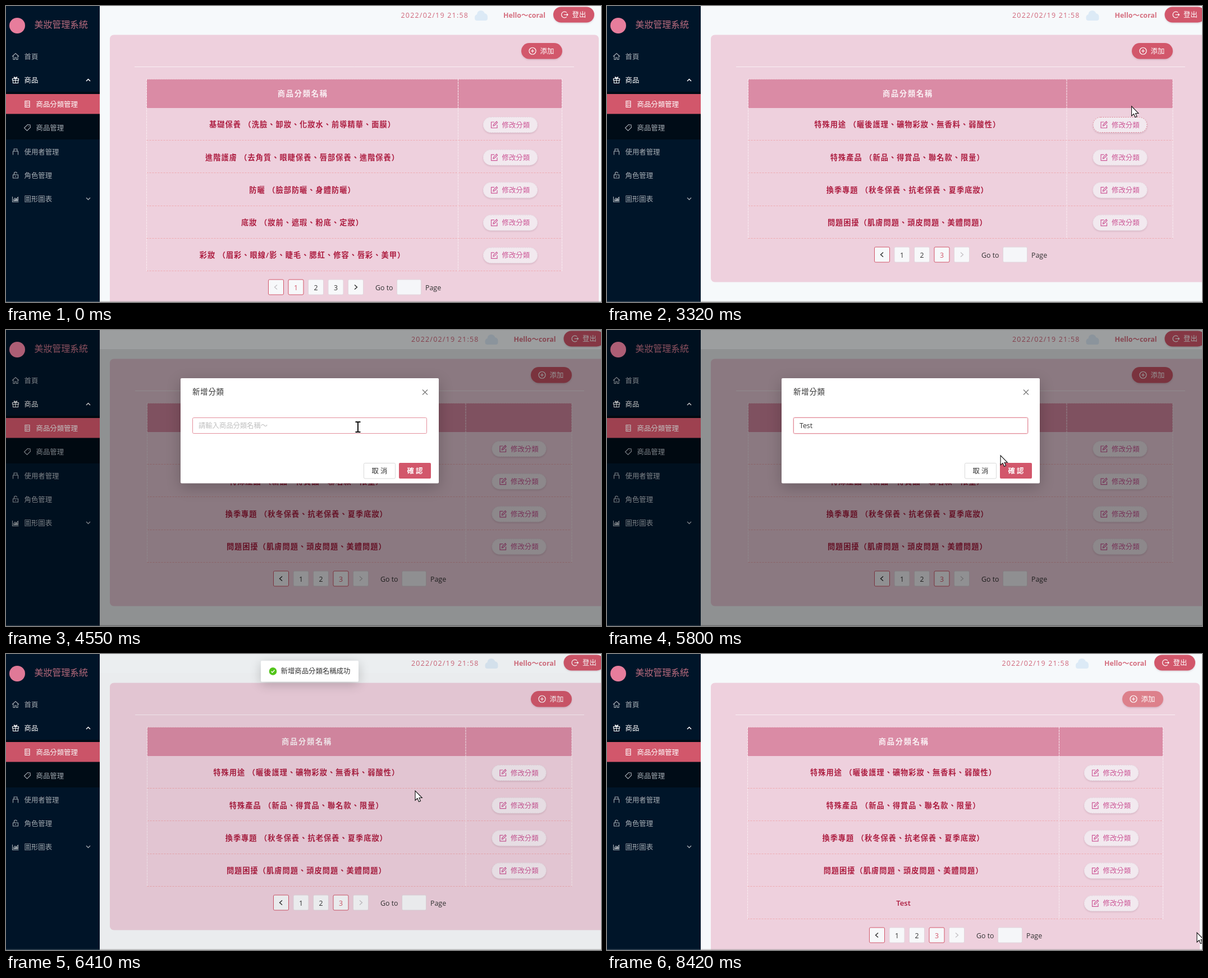
Animation, 1060 px wide and 528 px high, one loop 8500 ms. Source, as an HTML page with a canvas:

```html
<!DOCTYPE html>
<html lang="zh-Hant">
<head>
<meta charset="utf-8">
<title>管理系統</title>
<style>
html, body { margin: 0; width: 100%; height: 100%; overflow: hidden; background: #f6f9fb; }
canvas { display: block; width: 1060px; height: 528px; }
</style>
</head>
<body>
<canvas id="stage" width="1060" height="528"></canvas>
<script>
const ctx = document.getElementById('stage').getContext('2d');
const LOOP = 8500, HOLD = 840, STEP = 77.3;
const FONT = '"Open Sans", "Noto Sans CJK TC", "Noto Sans CJK JP", sans-serif';
const ROSE = '#d2576b', ROSE_LIGHT = '#dd808b', PINK = '#eed0dd', CRIMSON = '#ad1d40';

const PAGES = [
  ['基礎保養 （洗臉、卸妝、化妝水、前導精華、面膜）', '進階護膚 （去角質、眼睫保養、唇部保養、進階保養）',
   '防曬 （臉部防曬、身體防曬）', '底妝 （妝前、遮瑕、粉底、定妝）',
   '彩妝 （眉彩、眼線/影、睫毛、腮紅、修容、唇彩、美甲）'],
  ['身體保養 （手部保養、腿足保養、私密護理、沐浴清潔）', '美髮 （洗髮、潤/護髮、染髮、頭皮護理、頭髮造型）',
   '香水香氛 （香水、香精、香氛）', '美容工具 （臉部保養工具、彩妝工具、按摩工具、美容家電）',
   '營養補給 （膠原蛋白、玻尿酸、積雪草 、維他命）'],
  ['特殊用途 （曬後護理、礦物彩妝、無香料、弱酸性）', '特殊產品 （新品、得賞品、聯名款、限量）',
   '換季專題 （秋冬保養、抗老保養、夏季底妝）', '問題困擾（肌膚問題、頭皮問題、美體問題）', 'Test']
];

const ICONS = {
  home: 'M-6 0L0-5.5L6 0M-4-1.5V5.5H-1.3V2H1.3V5.5H4V-1.5',
  gift: 'M-5.5-2.5H5.5V.5H-5.5ZM-4.5 .5V5.5H4.5V.5M0-2.5V5.5M0-2.5C-5-4-2-8 0-2.5C2-8 5-4 0-2.5',
  list: 'M-4-5.5H4V5.5H-4ZM-4-2H4M-4 2H4M-2-4H-.5M-2 0H-.5M-2 4H-.5',
  tag: 'M-5.5 .5L.5-5.5L5-5L5.5-.5L-.5 5.5ZM2-2.5H3',
  user: 'M-2.8-5H2.8V-1H-2.8ZM-4.5 5.5V-1H4.5V5.5',
  lock: 'M-4.5-1H4.5V5H-4.5ZM-2.5-1V-3A2.5 2.5 0 0 1 2.5-3.5M0 1V3',
  chart: 'M-5.5-4.5V5H5.5M-3.5 3V1L-1-2L1 0L4.5-3.5V3ZM-2.5 2H3.5M-2 1H4M0 .5H4',
  edit: 'M0-5H-5.5V5.5H5V0M-2 2L-1.5-.5L4-6L5.5-4L0 1.5Z',
  plus: 'M6 0A6 6 0 1 1-6 0A6 6 0 1 1 6 0M-3 0H3M0-3V3',
  exit: 'M3.8-3.8A5.4 5.4 0 1 0 3.8 3.8M-1 0H6M4-2L6 0L4 2',
  close: 'M-4.5-4.5L4.5 4.5M4.5-4.5L-4.5 4.5',
  up: 'M-3.5 2L0-1.5L3.5 2', down: 'M-3.5-2L0 1.5L3.5-2',
  prev: 'M2-4L-2.5 0L2 4', next: 'M-2-4L2.5 0L-2 4',
  check: 'M-3 0L-1 2L3-2.2'
};
const POINTERS = {
  arrow: 'M0 0V17L4 13.5L6.5 19.5L9.5 18.2L7 12.5H12.3Z',
  hand: 'M-1.5 1C-1.5-.7 1.7-.7 1.7 1V8L8 9.5Q9.5 10 9.2 12L8 18V22H-1V19.5L-6 13.5C-7.5 11-5 10-3.8 11.5L-1.5 13.8Z',
  beam: 'M-4.5-9H-1L0-8L1-9H4.5M0-8V8M-4.5 9H-1L0 8L1 9H4.5'
};

// time, x, y, pointer shape
const TRACK = [
  [840, 546, 526, 'arrow'], [980, 546, 506, 'hand'], [1070, 546, 503, 'hand'], [1500, 546, 503, 'hand'],
  [2000, 583, 502, 'hand'], [2390, 583, 502, 'arrow'], [2560, 583, 502, 'arrow'], [3090, 890, 225, 'hand'],
  [3230, 922, 202, 'hand'], [3310, 934, 181, 'arrow'], [3470, 958, 90, 'hand'], [3620, 968, 83, 'hand'],
  [4080, 968, 83, 'arrow'], [4380, 690, 160, 'beam'], [4540, 627, 173, 'beam'], [5480, 627, 173, 'beam'],
  [5640, 655, 195, 'arrow'], [5870, 727, 240, 'hand'], [5950, 729, 244, 'hand'], [6320, 729, 244, 'arrow'],
  [6550, 729, 244, 'arrow'], [6950, 905, 98, 'arrow'], [7040, 930, 85, 'hand'], [7880, 952, 83, 'hand'],
  [8060, 960, 90, 'arrow'], [8410, 1051, 497, 'arrow'], [LOOP, 1051, 497, 'arrow']
];

const clamp = v => Math.max(0, Math.min(1, v));
const span = (t, from, to) => clamp((t - from) / (to - from));
const within = (t, from, to) => t >= from && t < to;

function text(s, x, y, color, { size = 12.4, weight = 400, gap = 0, align = 'left' } = {}) {
  ctx.font = `${weight} ${size}px ${FONT}`;
  ctx.letterSpacing = gap + 'px';
  ctx.textAlign = align;
  ctx.fillStyle = color;
  ctx.fillText(s, x, y + size * 0.37);
}

function box(x, y, w, h, fill, { r = 0, stroke, dash = [] } = {}) {
  ctx.beginPath();
  ctx.roundRect(x, y, w, h, r);
  if (fill) { ctx.fillStyle = fill; ctx.fill(); }
  if (stroke) {
    ctx.setLineDash(dash);
    ctx.strokeStyle = stroke;
    ctx.lineWidth = 1;
    ctx.stroke();
    ctx.setLineDash([]);
  }
}

function line(x1, y1, x2, y2, color, dash = []) {
  ctx.beginPath();
  ctx.moveTo(x1, y1);
  ctx.lineTo(x2, y2);
  ctx.setLineDash(dash);
  ctx.strokeStyle = color;
  ctx.lineWidth = 1;
  ctx.stroke();
  ctx.setLineDash([]);
}

function disc(x, y, r, color) {
  ctx.beginPath();
  ctx.arc(x, y, r, 0, Math.PI * 2);
  ctx.fillStyle = color;
  ctx.fill();
}

function icon(name, x, y, color, width = 1.1) {
  ctx.save();
  ctx.translate(x, y);
  ctx.strokeStyle = color;
  ctx.lineWidth = width;
  ctx.stroke(new Path2D(ICONS[name]));
  ctx.restore();
}

function shadow(color, blur, dy = 0) {
  ctx.shadowColor = color;
  ctx.shadowBlur = blur;
  ctx.shadowOffsetY = dy;
}

function pill(x, y, w, h, label, glyph, fill, color, opts = {}) {
  ctx.save();
  shadow('rgba(90,40,60,.16)', 3, 1.5);
  box(x, y, w, h, fill, { r: h / 2 });
  ctx.restore();
  if (opts.stroke) box(x + .5, y + .5, w - 1, h - 1, null, { r: h / 2, ...opts });
  icon(glyph, x + 20, y + h / 2, color, 1.2);
  text(label, x + 33.5, y + h / 2, color);
}

function sidebar() {
  const dim = '#a6adb4';
  box(0, 0, 167, 528, '#001529');
  box(0, 153, 167, 85, '#000c17');
  box(0, 157, 167, 35.5, ROSE);
  disc(20, 35, 14, '#e77d9c');
  text('美妝管理系統', 50.5, 33, '#b96b7e', { size: 15.9 });
  [['home', '首頁', 90], ['gift', '商品', 132, '#fff'], ['user', '使用者管理', 260],
   ['lock', '角色管理', 302], ['chart', '圖形圖表', 344.5]].forEach(([glyph, label, y, color = dim]) => {
    icon(glyph, 17, y, color);
    text(label, 32.5, y, color);
  });
  icon('list', 38, 175, '#fff');
  text('商品分類管理', 53.5, 175, '#fff');
  icon('tag', 38, 217, dim);
  text('商品管理', 53.5, 217.5, dim);
  icon('up', 146.5, 132, '#fff', 1.5);
  icon('down', 146.5, 344, dim, 1.3);
}

function topBar(dx) {
  text('2022/02/19 21:58', 703.5 + dx, 16.5, '#d0667a', { size: 12.4, gap: 1.25 });
  const x = 846 + dx;
  [[-6, 3, 5], [0, -2, 7], [6, 2, 6]].forEach(([cx, cy, r]) => disc(x + cx, 17 + cy, r, '#dceaf6'));
  box(x - 11, 18, 23, 8, '#dceaf6', { r: 4 });
  text('Hello～coral', 886 + dx, 16.5, '#d57080', { size: 12.4, weight: 700 });
  pill(975 + dx, 1.5, 73, 28, '登出', 'exit', ROSE, '#fff');
}

function table(t, wide, rows) {
  const left = wide ? 251.5 : 250.5, right = wide ? 1008 : 990.5, mid = wide ? 819 : 805.5;
  const bottom = 182 + rows.length * 58.2;
  const cx = (left + mid) / 2, bx = wide ? 865.5 : 850;
  box(left, 130, right - left, 52, '#da8ba5');
  line(left, 130.5, right, 130.5, '#f6e6ec', [2, 1]);
  text('商品分類名稱', cx + .7, 156.5, '#faf0f4', { size: 13.3, weight: 700, gap: 1.7, align: 'center' });
  rows.forEach((row, i) => {
    const y = 211.5 + i * 58.2, hot = i === 0 && within(t, 3080, 3380);
    text(row, cx, y, CRIMSON, { size: 13.2, weight: 600, gap: row === 'Test' ? 0 : 1.05, align: 'center' });
    const base = Math.round(182 + (i + 1) * 58.2) - .5;
    line(left, base, right, base, '#eeaab1', [3, 2]);
    pill(bx, y - 13.5, 97, 28, '修改分類', 'edit', '#f2e9ef', '#cc5796',
      { stroke: hot ? '#df7f90' : '#e6dbe3', dash: [2, 2] });
  });
  [left, mid, right].forEach(x => line(x, 130, x, bottom, '#f8eaf0', [4, 1]));
}

function pagination(t, dx, y, page) {
  const labels = ['prev', '1', '2', '3', 'next'];
  const hovered = within(t, 990, 1900) ? 2 : within(t, 2140, 2390) ? 3 : 0;
  labels.forEach((label, i) => {
    const x = 467.5 + dx + i * 35.5, on = i === page, hot = i === hovered;
    box(x, y, 27, 27, '#f7f8fa', { r: 2, stroke: on || hot ? ROSE : '#e1d5dc' });
    if (ICONS[label]) {
      const off = i ? page === 3 : t < 1500;
      icon(label, x + 13.5, y + 13.5, off ? '#c3c0c4' : '#222', 1.3);
    } else {
      text(label, x + 13.5, y + 14, on && hot ? '#e79aa6' : on || hot ? ROSE : '#333', { align: 'center' });
    }
  });
  text('Go to', 658 + dx, y + 14, '#333');
  box(696.5 + dx, y, 43, 27, '#f5f6f9', { r: 2, stroke: '#e1d5dc' });
  text('Page', 747 + dx, y + 14, '#333');
}

function content(t) {
  const wide = within(t, 2390, 6550);
  const page = t < 1215 ? 1 : t < 2300 ? 2 : 3;
  const shown = t < 1215 ? 0 : t < 2390 ? 1 : 2;
  const rows = PAGES[shown].slice(0, wide ? 4 : 5);
  box(167, 0, 893, 528, '#f6f9fb');
  topBar(wide ? 18.5 : 0);
  box(185, 51.5, wide ? 889 : 871, wide ? 441 : 500, PINK, { r: 7 });
  line(wide ? 230 : 229, 108.5, wide ? 1030 : 1012, 108.5, '#f9eef3');
  const hot = within(t, 3450, 4000) || t >= 7030;
  pill(wide ? 935 : 918, 66, 73, 28.5, '添加', 'plus', hot ? ROSE_LIGHT : ROSE, '#fff');
  table(t, wide, rows);
  pagination(t, wide ? 9 : 0, wide ? 430 : 488, page);
  box(0, 526.5, 1060, 1.5, 'rgba(150,150,150,.55)');
}

function mask(t) {
  const a = .42 * (t < 6000 ? span(t, 3990, 4230) : 1 - .88 * span(t, 6270, 6400));
  if (t < 3990 || t > 6450) return;
  box(167, 0, 893, 33.5, `rgba(0,0,0,${a * .88})`);
  box(167, 33.5, 893, 494.5, `rgba(0,0,0,${a})`);
  box(0, 0, 167, 528, `rgba(0,0,0,${a * .6})`);
}

function modal(t) {
  const closing = t > 6200;
  const p = closing ? 1 - span(t, 6200, 6400) ** 2.3 : 1 - (1 - span(t, 4060, 4270)) ** 3;
  if (p <= 0) return;
  ctx.save();
  ctx.globalAlpha = p;
  ctx.translate(980, 80);
  ctx.scale(.2 + .8 * p, .2 + .8 * p);
  ctx.translate(-980, -80);
  ctx.save();
  shadow('rgba(0,0,0,.22)', 26, 7);
  box(311, 86, 460, 187.5, '#fff', { r: 2 });
  ctx.restore();
  text('新增分類', 332, 110.5, '#333', { size: 13.4, gap: .8 });
  icon('close', 746.5, 111, '#777', 1.2);

  const focus = within(t, 4850, 6200);
  if (focus) box(331.5, 155.5, 419, 30, null, { r: 3, stroke: 'rgba(210,87,107,.25)' });
  if (!closing) box(332.5, 156.5, 417, 28, '#fff', { r: 2, stroke: t > 4380 ? '#e48f9c' : '#d9d9d9' });
  const typed = closing || t < 5250 ? '' : t < 5480 ? 'Tes' : 'Test';
  text(typed || '請輸入商品分類名稱～', 343, 170.5, typed ? '#333' : '#bfbfbf', { size: 12.3 });

  if (!closing) box(637.5, 237.5, 56, 27.5, '#fff', { r: 2, stroke: '#d9d9d9' });
  text('取 消', 665.5, 251, '#333', { align: 'center' });
  box(700, 237, 57, 28, within(t, 5860, 6400) ? ROSE_LIGHT : ROSE, { r: 2 });
  text('確 認', 728.5, 251, '#fff', { weight: 600, align: 'center' });
  ctx.restore();
}

function message(t) {
  if (t < 6215 || t > 7800) return;
  const p = 1 - (1 - span(t, 6215, 6515)) ** 6, out = span(t, 7500, 7800);
  const y = 12 - 51 * (1 - p) - 40 * out * out;
  ctx.save();
  ctx.globalAlpha = clamp(p * 1.6) * (1 - out);
  ctx.save();
  shadow('rgba(0,0,0,.2)', 20, 5);
  box(454, y, 174, 37.5, '#fff', { r: 2 });
  ctx.restore();
  disc(475.5, y + 19, 6.8, '#52c41a');
  icon('check', 475.5, y + 19, '#fff', 1.4);
  text('新增商品分類名稱成功', 489.5, y + 19, '#333');
  ctx.restore();
}

function pointer(t) {
  if (t < TRACK[0][0]) return;
  let i = 0;
  while (i < TRACK.length - 2 && TRACK[i + 1][0] <= t) i++;
  const [t0, x0, y0, shape] = TRACK[i], [t1, x1, y1] = TRACK[i + 1];
  const k = span(t, t0, t1);
  ctx.save();
  ctx.translate(x0 + (x1 - x0) * k, y0 + (y1 - y0) * k);
  const path = new Path2D(POINTERS[shape]);
  ctx.strokeStyle = '#111';
  ctx.lineWidth = shape === 'beam' ? 2 : 1.1;
  ctx.fillStyle = '#fff';
  if (shape !== 'beam') ctx.fill(path);
  ctx.stroke(path);
  ctx.restore();
}

function draw(t) {
  ctx.clearRect(0, 0, 1060, 528);
  content(t);
  sidebar();
  box(0, 526.5, 167, 1.5, 'rgba(120,130,140,.4)');
  mask(t);
  modal(t);
  message(t);
  pointer(t);
}

const sample = t => t < HOLD ? 0 : HOLD + Math.floor((t - HOLD + 8) / STEP) * STEP;

const start = performance.now();
function tick() {
  draw(sample((performance.now() - start) % LOOP));
  requestAnimationFrame(tick);
}
tick();
</script>
</body>
</html>
```
